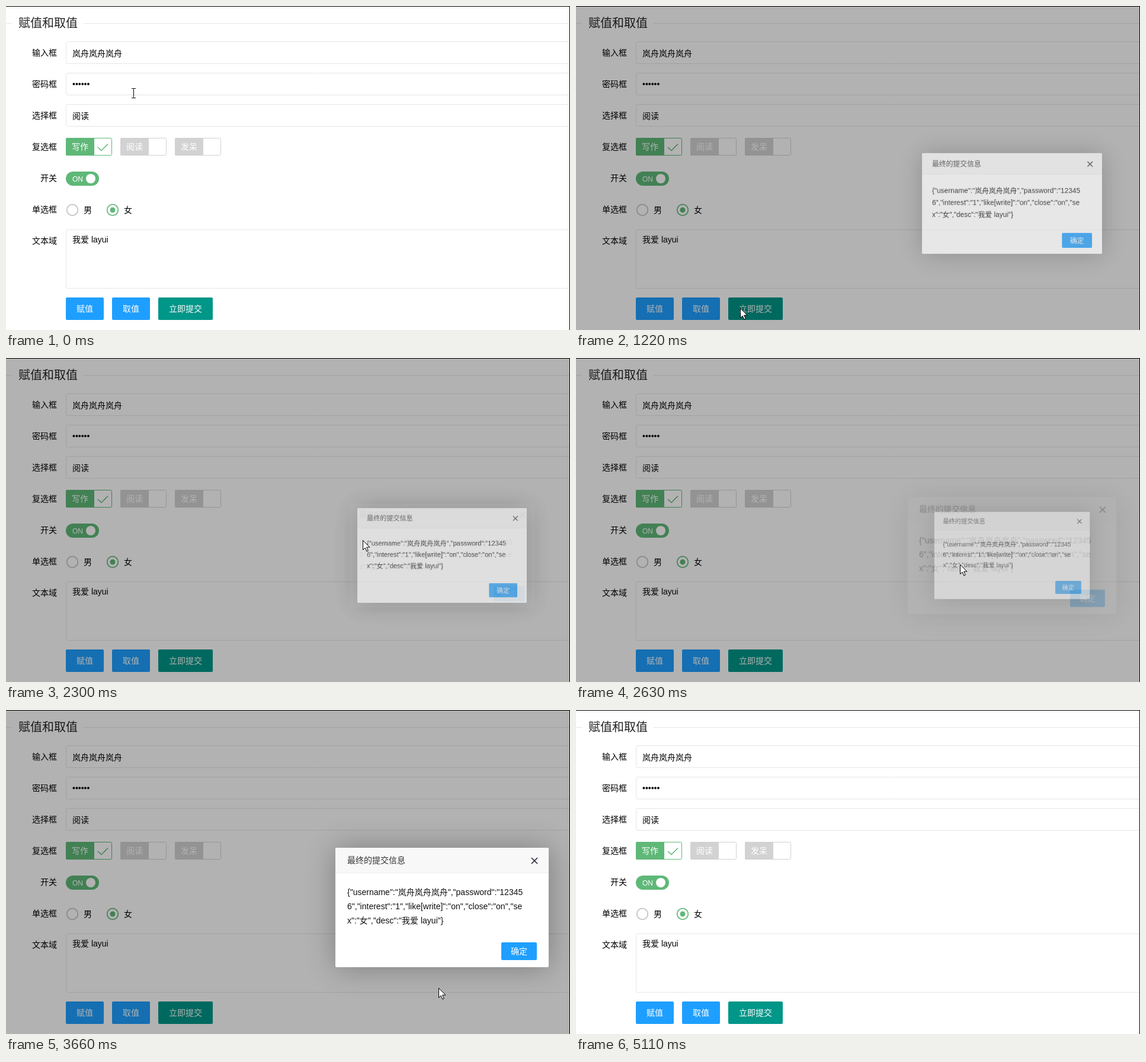
These frames come from a looping animation (952 px wide and 548 px high, 5.44 s). An HTML page with a canvas:

```html
<!DOCTYPE html>
<html lang="zh-CN">
<head>
<meta charset="utf-8">
<title>赋值和取值</title>
<style>
  html, body { margin: 0; width: 100%; height: 100%; overflow: hidden; background: #fff; }
  canvas { display: block; width: 100vw; height: 100vh; }
</style>
</head>
<body>
<canvas id="stage" width="952" height="548"></canvas>
<script>
const W = 952, H = 548, LOOP = 5440;
const ctx = document.getElementById('stage').getContext('2d');
const FACE = '"Liberation Sans", "Noto Sans CJK SC", "Noto Sans CJK", sans-serif';
const NAME = '岚舟岚舟岚舟';
const GREEN = '#5fb878', BLUE = '#1e9fff', TEAL = '#009688', GREY = '#d2d2d2', LINE = '#e6e6e6';

// Each press submits the form: a new dialog pops in while the previous one pops out.
const PRESSES = [1100, 1796, 2199, 2549, 2899, 3280, 3740, 4150];
const CLOSE = 4740, IN_MS = 300, OUT_MS = 200;
const BOX = { x: 556, y: 233, w: 360, h: 202 };
const OK = { x: 836, y: 393, w: 60, h: 30 };
const PAD = 90;

const PATH = [
  [50, 215, 147], [540, 264, 519], [1160, 264, 519], [1690, 616, 314],
  [1850, 616, 314], [2300, 602, 308], [3000, 702, 397], [3660, 730, 470],
  [4000, 736, 466], [4550, 846, 400], [4880, 846, 400], [5090, 970, 480]
];

const clamp = v => Math.max(0, Math.min(1, v));
const mix = (a, b, k) => a + (b - a) * k;
const inside = (r, x, y) => x >= r.x && x < r.x + r.w && y >= r.y && y < r.y + r.h;

// CSS "ease": cubic-bezier(.25, .1, .25, 1)
function ease(x) {
  let lo = 0, hi = 1, u = x;
  const bez = (p, q) => 3 * u * (1 - u) ** 2 * p + 3 * u * u * (1 - u) * q + u ** 3;
  for (let i = 0; i < 24; i++) {
    u = (lo + hi) / 2;
    if (bez(.25, .25) < x) lo = u; else hi = u;
  }
  return bez(.1, 1);
}

function text(c, s, x, y, color = '#000', size = 14, weight = 400, align = 'left') {
  c.font = `${weight} ${size}px ${FACE}`;
  c.textAlign = align;
  c.fillStyle = color;
  c.fillText(s, x, y);
}

function box(c, x, y, w, h, r, fill) {
  c.beginPath();
  c.roundRect(x, y, w, h, r);
  c.fillStyle = fill;
  c.fill();
}

function frame(c, x, y, w, h, color) {
  c.beginPath();
  c.roundRect(x + .5, y + .5, w - 1, h - 1, 2);
  c.strokeStyle = color;
  c.lineWidth = 1;
  c.stroke();
}

function poly(c, pts, close) {
  c.beginPath();
  pts.forEach(([x, y]) => c.lineTo(x, y));
  if (close) c.closePath();
}

function ring(c, x, y, r, color, width) {
  c.beginPath();
  c.arc(x, y, r, 0, 7);
  if (width) { c.strokeStyle = color; c.lineWidth = width; c.stroke(); }
  else { c.fillStyle = color; c.fill(); }
}

function button(c, s, x, y, w, h, color) {
  box(c, x, y, w, h, 2, color);
  text(c, s, x + w / 2, y + h / 2 + 5, '#fff', 14, 400, 'center');
}

function layer(w, h, draw) {
  const cv = document.createElement('canvas');
  cv.width = w;
  cv.height = h;
  draw(cv.getContext('2d'));
  return cv;
}

function checkbox(c, s, x, on) {
  frame(c, x, 223, 78, 30, on ? GREEN : GREY);
  box(c, x, 223, 48, 30, [2, 0, 0, 2], on ? GREEN : GREY);
  text(c, s, x + 10, 243, '#fff');
  if (!on) return;
  poly(c, [[x + 54, 239], [x + 60, 244.5], [x + 71, 233.5]]);
  c.strokeStyle = GREEN;
  c.lineWidth = 1.6;
  c.stroke();
}

function drawForm(c) {
  c.fillStyle = '#fff';
  c.fillRect(0, 0, W, H);
  c.fillStyle = LINE;
  c.fillRect(0, 29, 10, 1);
  c.fillRect(131, 29, W, 1);
  text(c, '赋值和取值', 21, 36, '#222', 20, 300);

  ['输入框', '密码框', '选择框', '复选框', '开关', '单选框', '文本域'].forEach((s, i) =>
    text(c, s, 86, 84 + i * 53, undefined, 14, 400, 'right'));
  [60, 113, 166].forEach(y => frame(c, 101, y, 900, 38, LINE));
  frame(c, 101, 378, 900, 100, LINE);
  text(c, NAME, 112, 85);
  text(c, '••••••', 112, 137);
  text(c, '阅读', 112, 191);
  text(c, '我爱 layui', 112, 400);

  checkbox(c, '写作', 101, true);
  checkbox(c, '阅读', 193);
  checkbox(c, '发呆', 285);

  box(c, 101, 280, 56, 24, 12, GREEN);
  text(c, 'ON', 112, 297, '#fff', 12);
  ring(c, 143, 292, 8, '#fff');

  ring(c, 112, 345, 9.3, '#c2c2c2', 1.7);
  text(c, '男', 131, 350);
  ring(c, 180, 345, 9.3, GREEN, 1.7);
  ring(c, 180, 345, 4.5, GREEN);
  text(c, '女', 199, 350);

  button(c, '赋值', 101, 493, 64, 38, BLUE);
  button(c, '取值', 179, 493, 64, 38, BLUE);
  button(c, '立即提交', 257, 493, 92, 38, TEAL);
}

function drawDialog(c) {
  c.translate(PAD - BOX.x, PAD - BOX.y);
  c.shadowColor = 'rgba(0,0,0,.3)';
  c.shadowBlur = 50;
  c.shadowOffsetX = c.shadowOffsetY = 1;
  // Opaque fill keeps the shadow at its own strength.
  box(c, BOX.x, BOX.y, BOX.w, BOX.h, 2, '#fff');
  c.shadowColor = 'transparent';
  box(c, BOX.x, BOX.y, BOX.w, 43, [2, 2, 0, 0], '#f8f8f8');
  c.fillStyle = '#eee';
  c.fillRect(BOX.x, BOX.y + 42, BOX.w, 1);
  text(c, '最终的提交信息', 576, 259, '#333');
  c.strokeStyle = '#2e2d3c';
  c.lineWidth = 1.7;
  [1, -1].forEach(k => {
    poly(c, [[887, 255 - 5 * k], [897, 255 + 5 * k]]);
    c.stroke();
  });
  [
    `{"username":"${NAME}","password":"12345`,
    '6","interest":"1","like[write]":"on","close":"on","se',
    'x":"女","desc":"我爱 layui"}'
  ].forEach((s, i) => text(c, s, 576, 313 + i * 24, '#111'));
  button(c, '确定', OK.x, OK.y, OK.w, OK.h, BLUE);
}

const form = layer(W, H, drawForm);
const dialog = layer(BOX.w + 2 * PAD, BOX.h + 2 * PAD, drawDialog);

function placeDialog(scale, alpha) {
  ctx.save();
  ctx.translate(BOX.x + BOX.w / 2, BOX.y + BOX.h / 2);
  ctx.scale(scale, scale);
  ctx.globalAlpha = alpha;
  ctx.imageSmoothingQuality = 'high';
  ctx.drawImage(dialog, -dialog.width / 2, -dialog.height / 2);
  ctx.restore();
}

function popIn(ms) {
  const k = ease(clamp(ms / IN_MS));
  placeDialog(mix(.5, 1, k), k);
}

function popOut(ms) {
  if (ms < 0 || ms >= OUT_MS) return;
  const p = ms / OUT_MS;
  const scale = p < .3 ? mix(1, 1.05, ease(p / .3)) : mix(1.05, .7, ease((p - .3) / .7));
  placeDialog(scale, 1 - ease(p));
}

function pointerAt(t) {
  const i = PATH.findIndex(p => p[0] > t);
  if (i < 0) return null;
  if (i === 0) return PATH[0].slice(1);
  const [a, b] = [PATH[i - 1], PATH[i]];
  let k = (t - a[0]) / (b[0] - a[0]);
  k = k * k * (3 - 2 * k);
  return [mix(a[1], b[1], k), mix(a[2], b[2], k)].map(Math.round);
}

function pointerKind(t, x, y) {
  if (t >= 1160 && t < CLOSE + 140) return inside(OK, x, y) ? 'hand' : 'arrow';
  if (x > 101 && [[60, 98], [113, 151], [378, 478]].some(r => y >= r[0] && y < r[1])) return 'beam';
  if (y >= 493 && y < 531 && x >= 257 && x < 349) return 'hand';
  if (x > 101 && y >= 166 && y < 204) return 'hand';
  if (y >= 223 && y < 253 && x >= 193 && x < 271) return 'hand';
  return 'arrow';
}

const ARROW = [[0, 0], [0, 16], [3.7, 12.6], [6.3, 18.6], [8.8, 17.5], [6.2, 11.6], [11.5, 11.6]];
const HAND = [
  [-1, 1], [0, 0], [2, 0], [3, 1], [3, 7], [5, 6.5], [6.5, 8], [8.5, 7.7], [9.5, 9],
  [11, 9], [12, 10.5], [12, 16], [10, 20], [10, 24], [0, 24], [0, 21], [-5, 14],
  [-5, 11.5], [-3, 11], [-1, 13.5]
];

function drawPointer(t) {
  const p = pointerAt(t);
  if (!p) return;
  const [x, y] = p, kind = pointerKind(t, x, y);
  ctx.save();
  ctx.translate(x + .5, y + .5);
  ctx.strokeStyle = '#000';
  ctx.lineWidth = 1;
  if (kind === 'beam') {
    poly(ctx, [[0, -7], [0, 7]]);
    [-8, 8].forEach(d => {
      ctx.moveTo(-3.5, d);
      ctx.lineTo(3.5, d);
    });
    ctx.stroke();
  } else {
    poly(ctx, kind === 'hand' ? HAND : ARROW, true);
    ctx.fillStyle = '#fff';
    ctx.fill();
    ctx.stroke();
    if (kind === 'hand') {
      ctx.beginPath();
      [3, 6.5, 9.5].forEach(d => {
        ctx.moveTo(d, 8);
        ctx.lineTo(d, 12);
      });
      ctx.stroke();
    }
  }
  ctx.restore();
}

function render(t) {
  ctx.drawImage(form, 0, 0);
  const open = t >= PRESSES[0] && t < CLOSE;
  if (open) {
    // The outgoing dialog lies under the shade, the incoming one above it.
    PRESSES.slice(1).forEach(p => popOut(t - p));
    ctx.fillStyle = 'rgba(0,0,0,.3)';
    ctx.fillRect(0, 0, W, H);
    popIn(t - Math.max(...PRESSES.filter(p => p <= t)));
  } else {
    popOut(t - CLOSE);
  }
  ctx.fillStyle = '#000';
  ctx.fillRect(0, 0, W, 1);
  ctx.fillRect(W - 1, 0, 1, H);
  drawPointer(t);
}

const start = performance.now();
function tick() {
  render((performance.now() - start) % LOOP);
  requestAnimationFrame(tick);
}
tick();
</script>
</body>
</html>
```
